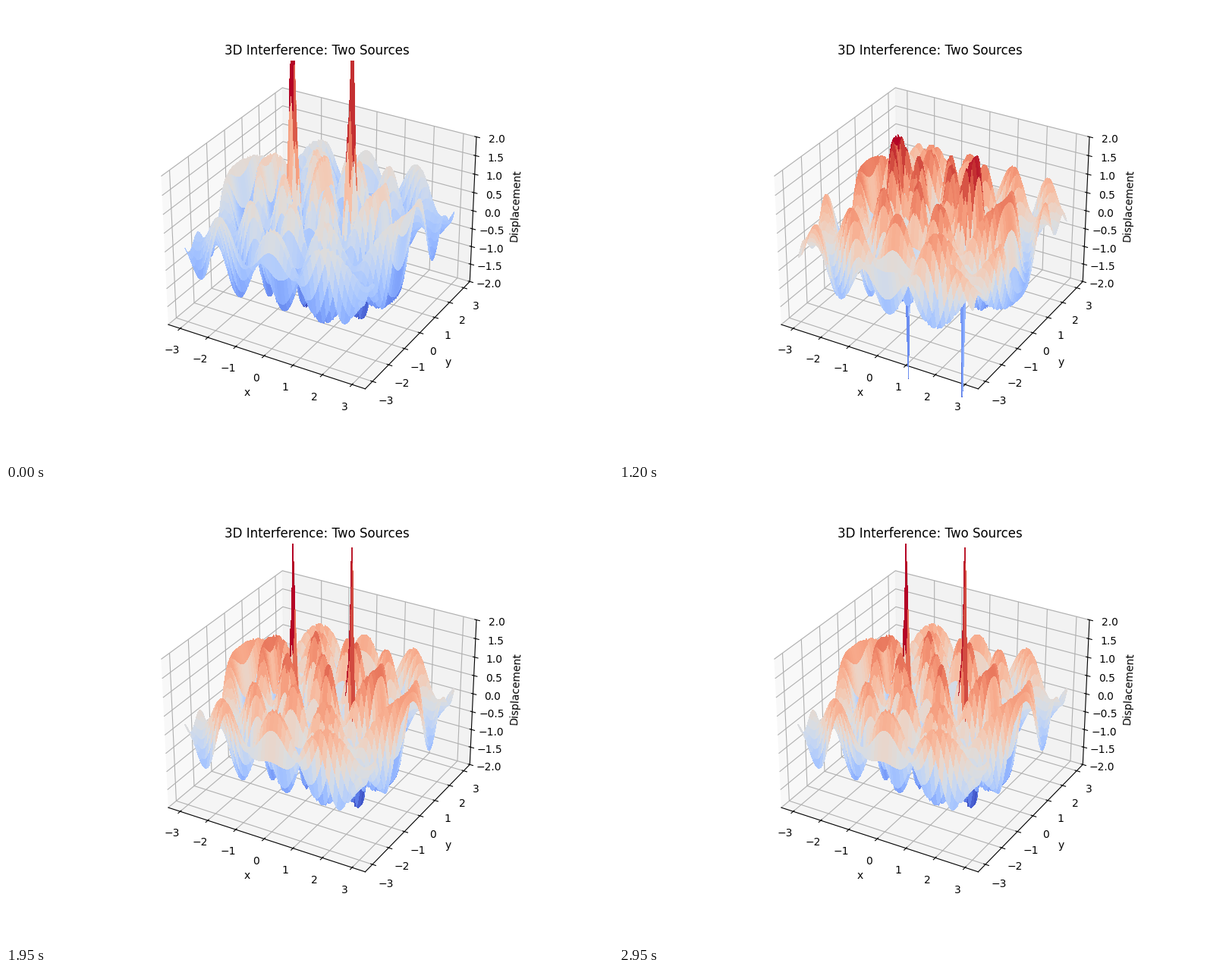
These frames come from a looping animation (800x600 px, 3 s). A matplotlib script:

```python
import numpy as np
import matplotlib.pyplot as plt
from matplotlib.animation import FuncAnimation

FRAMES = 60
INTERVAL = 50
STEPS = 10            # frames per wave period
WAVELENGTH = 1.0
SOURCES = [(-1.0, 0.0), (1.0, 0.0)]

axis = np.linspace(-3, 3, 100)
X, Y = np.meshgrid(axis, axis)


def wave(source, phase):
    """Circular wave whose amplitude falls off as 1/sqrt(r)."""
    r = np.hypot(X - source[0], Y - source[1])
    return np.cos(2 * np.pi * r / WAVELENGTH - phase) / np.sqrt(r)


def displacement(step):
    phase = 2 * np.pi * step / STEPS
    return sum(wave(s, phase) for s in SOURCES)


fig = plt.figure(figsize=(8, 6), dpi=100)
ax = fig.add_subplot(111, projection="3d")

# The motion is periodic, so one surface per phase step is enough.
surfaces = [
    ax.plot_surface(X, Y, displacement(i), cmap="coolwarm",
                    linewidth=0, antialiased=False)
    for i in range(STEPS)
]

ax.set_zlim(-2, 2)
ax.set_title("3D Interference: Two Sources")
ax.set_xlabel("x")
ax.set_ylabel("y")
ax.set_zlabel("Displacement")


def update(frame):
    for i, surface in enumerate(surfaces):
        surface.set_visible(i == frame % STEPS)
    return surfaces


anim = FuncAnimation(fig, update, frames=FRAMES, interval=INTERVAL,
                     init_func=lambda: update(0), blit=False,
                     repeat=True, repeat_delay=0)

plt.show()
```
